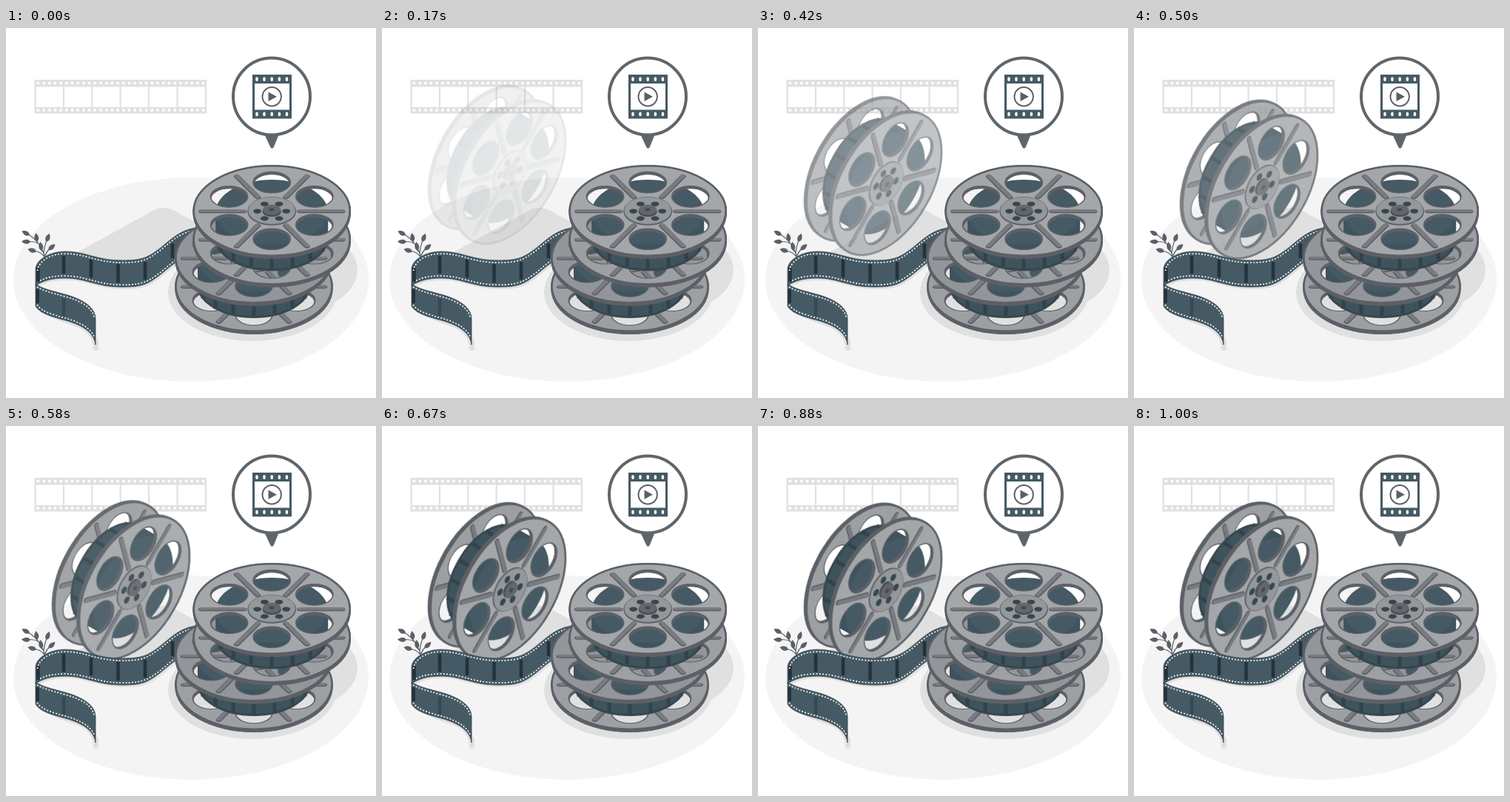
Recreate the animation shown at these times as an HTML page. Size 500x500 px, loop 1.04 s.

```html
<!DOCTYPE html>
<html lang="en">
<head>
<meta charset="utf-8">
<title>Film reels</title>
<style>
  html, body { margin: 0; width: 100%; height: 100%; overflow: hidden; background: #fff; }
  svg { display: block; width: 100vw; height: 100vh; }
  .shade { fill: #e0e0e0; }
  .film { fill: #455a64; stroke: #37474f; stroke-width: .8; }
  .bars { fill: none; stroke: #263238; stroke-width: 4.5; }
  .holes { fill: none; stroke: #fff; stroke-width: 1.6; stroke-dasharray: 2 2.2; }
  .plant { fill: #5b6068; }
  .stem { fill: none; stroke: #5b6068; stroke-width: 1.2; stroke-linecap: round; }
  .edge { fill: #5c6066; stroke: #5c6066; stroke-width: 1.5; }
  .face { fill: var(--face, #a3a7aa); stroke: #5c6066; stroke-width: 1.8; }
  .rib { stroke-linecap: round; fill: none; }
  .drop { animation: drop 1040ms infinite; }
  /* fall with a slight overshoot, then hold */
  @keyframes drop {
    0% { opacity: 0; transform: translateY(-30px); animation-timing-function: cubic-bezier(.345, .089, .5, 1.367); }
    92.3%, 100% { opacity: 1; transform: none; }
  }
</style>
</head>
<body>
<svg viewBox="0 0 500 500">
  <defs>
    <path id="disc" fill-rule="evenodd" d="M-106 0a106 106 0 1 0 212 0a106 106 0 1 0-212 0z
      M32.6 33.2a25 25 0 1 0 50 0a25 25 0 1 0-50 0z M32.6-33.2a25 25 0 1 0 50 0a25 25 0 1 0-50 0z
      M-82.6 33.2a25 25 0 1 0 50 0a25 25 0 1 0-50 0z M-82.6-33.2a25 25 0 1 0 50 0a25 25 0 1 0-50 0z
      M-25 66.5a25 25 0 1 0 50 0a25 25 0 1 0-50 0z M-25-66.5a25 25 0 1 0 50 0a25 25 0 1 0-50 0z"/>
    <path id="spokes" class="rib" d="M38 0H95M-38 0H-95M19 33L47.500 82.300M-19-33L-47.500-82.300M19-33L47.500-82.300M-19 33L-47.500 82.300"/>
    <g id="bolts">
      <circle cx="19.5" r="5.4"/><circle cx="-19.5" r="5.4"/>
      <circle cx="9.8" cy="16.9" r="5.4"/><circle cx="-9.8" cy="16.9" r="5.4"/>
      <circle cx="9.8" cy="-16.9" r="5.4"/><circle cx="-9.8" cy="-16.9" r="5.4"/>
    </g>
    <g id="plate">
      <use href="#disc" class="edge" transform="translate(0 3.5) scale(1 .577)"/>
      <g transform="scale(1 .577)">
        <use href="#disc" class="face"/>
        <use href="#spokes" y="1.500" stroke="#5c6066" stroke-width="8.500"/>
        <use href="#spokes" stroke="#787c80" stroke-width="6"/>
        <circle r="33" cy="1.5" fill="#5c6066"/>
        <circle r="32" cy="-.5" fill="#94989b" stroke="#6b6f74"/>
        <use href="#bolts" y="1" fill="#37474f"/>
        <circle r="12.5" cy="2" fill="#4c5056"/>
        <circle r="12" cy="-2.5" fill="#63666b"/>
        <circle r="3.6" cy="-2.5" fill="#45494f"/>
      </g>
      <ellipse rx="105.5" ry="60.700" fill="none" stroke="#5c6066" stroke-width="2.500"/>
    </g>
    <g id="roll">
      <path fill="#3f535d" d="M-76 2V37A76 43.9 0 0 0 76 37V2z"/>
      <path fill="none" stroke="#32424b" stroke-width="5" d="M-69 39V55M-52 53V69M-28 62V78M0 65V81M28 62V78M52 53V69M69 39V55"/>
      <path fill="none" stroke="#37474f" stroke-width="3" d="M-75 37A75 43 0 0 0 75 37"/>
      <ellipse cy="2" rx="76" ry="43.9" fill="#455a64"/>
    </g>
    <g id="reel">
      <use href="#plate" y="38.5" style="--face:#9ca0a3"/>
      <use href="#roll"/>
      <use href="#plate"/>
    </g>
    <path id="leaf" d="M0 0C-4-3-4-7 0-12C4-7 4-3 0 0z"/>
    <path id="back" d="M256 270C232 274 220 289 205 300S182 314 157 314C122 314 108 302 80 302C58 302 40 314 40 326V348C50 342 60 338 80 338C108 338 122 350 157 350C182 350 190 347 205 336S232 310 256 306z"/>
    <path id="front" d="M40 346C48 352 62 355 80 360C105 367 121 378 121 393V428C119 412 105 402 80 395C62 390 46 386 40 376z"/>
  </defs>

  <ellipse cx="250" cy="340" rx="240" ry="138" fill="#f4f4f4"/>
  <g class="shade">
    <path d="M95 304L200 246Q213 239 228 247L278 275L200 330H100z"/>
    <ellipse cx="365" cy="327" rx="110" ry="63"/>
    <ellipse cx="333" cy="357" rx="114" ry="66"/>
    <use href="#back" x="2" y="3"/>
    <path d="M44 376C52 388 66 394 84 400C105 406 118 414 118 434Q121 439 125 434V424L110 395z"/>
  </g>

  <!-- flat strip on the wall -->
  <path class="shade" fill-rule="evenodd" d="M38.500 70H271V115.500H38.500z
    M40.500 79.500V107H77V79.500z M79 79.500V107H115.300V79.500z M117.300 79.500V107H153.600V79.500z
    M155.600 79.500V107H192V79.500z M194 79.500V107H230.500V79.500z M232.500 79.500V107H269V79.500z"/>
  <path fill="none" stroke="#fff" stroke-width="3.600" stroke-dasharray="3.600 4.100" d="M41.500 74.500H269M41.500 111H269"/>

  <!-- pin -->
  <path fill="#5f656b" d="M348.500 142H369.500L362 160.500Q359.500 165 357 160.500z"/>
  <circle cx="359" cy="92.500" r="52" fill="#fff" stroke="#5f656b" stroke-width="4"/>
  <path fill="#455a64" fill-rule="evenodd" d="M333 63H386V122.500H333z M336 75V110.500H383V75z"/>
  <path stroke="#fff" stroke-width="3.400" stroke-linecap="round" d="M339 68v2.200m10-2.200v2.200m10.200-2.200v2.200m10.200-2.200v2.200m10-2.200v2.200M339 115.300v2.200m10-2.200v2.200m10.200-2.200v2.200m10.200-2.200v2.200m10-2.200v2.200"/>
  <circle cx="359.200" cy="92.700" r="12.700" fill="none" stroke="#5b6068" stroke-width="2"/>
  <path fill="#5b6068" d="M354.500 86.500L366 92.700L354.500 99z"/>

  <!-- plant -->
  <path class="stem" d="M53 312C50 298 42 286 30 279M51 304C52 296 53 292 55 287M52 309C48 304 44 302 39 301.500M52 309C54 304 56 301 59 298M43 291C40 289 36 288.500 31 288.500M49 302L47.500 298M43 291L41.500 287"/>
  <g class="plant">
    <use href="#leaf" transform="translate(32 280) rotate(-61)"/>
    <use href="#leaf" transform="translate(33 289) rotate(-88)"/>
    <use href="#leaf" transform="translate(42 289) rotate(-8)"/>
    <use href="#leaf" transform="translate(41 302) rotate(-75)"/>
    <use href="#leaf" transform="translate(48 301) rotate(-8)"/>
    <use href="#leaf" transform="translate(54.500 289) rotate(20)"/>
    <use href="#leaf" transform="translate(57.500 300) rotate(48)"/>
  </g>

  <g class="drop">
    <use href="#reel" transform="translate(173.500 220.500) rotate(120)"/>
  </g>

  <!-- loose film -->
  <use href="#back" class="film"/>
  <path class="bars" d="M225 291V311M188 316V340M151.500 319V344M115 313V337M78 308V332M43.500 324V343"/>
  <path class="holes" d="M256 273C232 277 220 292 205 303S182 317 157 317C122 317 108 305 80 305C60 305 44 315 42.500 328M46 341.500C54 337 64 335 80 335C108 335 122 347 157 347C182 347 190 344 205 333S232 307 256 303"/>
  <use href="#front" class="film"/>
  <path class="bars" d="M42.500 353V372"/>
  <path class="bars" stroke-opacity=".45" d="M78 366V389"/>
  <path class="holes" d="M42 350C50 355 62 358 80 363C102 369 117 378 119 391M42 374C48 383 62 387 80 392C102 398 114 406 119 417"/>

  <!-- stacked reels -->
  <use href="#reel" x="335" y="310.500" style="--face:#92969a"/>
  <use href="#reel" x="359.200" y="247"/>
</svg>
</body>
</html>
```
